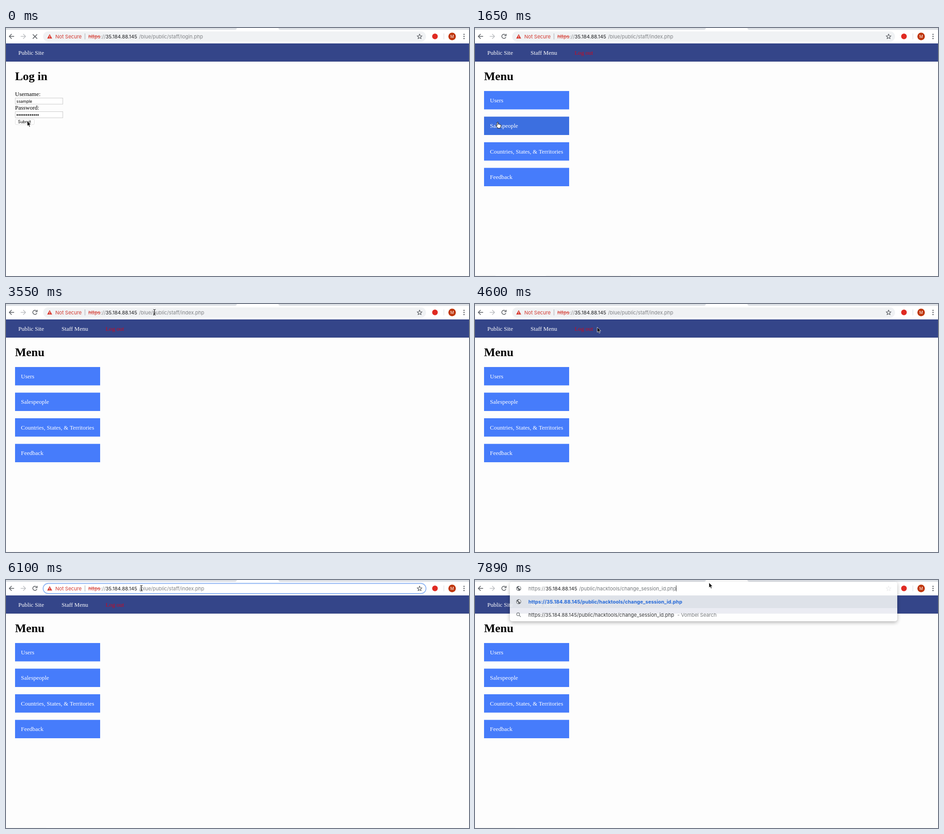
Write an HTML page that moves like this. It is 1023 by 547 pixels and loops after 8 s.

```html
<!DOCTYPE html>
<html lang="en">
<head>
<meta charset="utf-8">
<title>Staff log in</title>
<style>
html, body { margin: 0; width: 100%; height: 100%; overflow: hidden; background: #fdfdfd; }
svg { display: block; width: 100vw; height: 100vh; }
text { white-space: pre; }
.ui { font: 11px Inter, "Liberation Sans", sans-serif; }
.form { font: 8.8px Inter, "Liberation Sans", sans-serif; }
.page { font: 13px "Liberation Serif", "Times New Roman", serif; }
.title { font: bold 26px "Liberation Serif", "Times New Roman", serif; }
.line { fill: none; stroke-width: 1.5; }
.popup { filter: drop-shadow(0 3px 4px rgba(0, 0, 0, .32)); }
</style>
</head>
<body>
<svg viewBox="0 0 1023 547" preserveAspectRatio="none">
  <defs>
    <filter id="soft" x="-10%" y="-200%" width="120%" height="500%"><feGaussianBlur stdDeviation="1.2"/></filter>
    <g id="globe">
      <circle r="5.3" fill="#5b5f64"/>
      <path d="M-4.2-1.2L-.8 1.8V4.3C-3 4-4.6 1.8-4.2-1.2ZM.6-4.2C.6-2.6-.6-2.6-1.4-2V-.6H1.6V1.2H2.6L3.4 2.4C4.6.6 4.6-2.6 1.8-3.9Z" fill="#fff"/>
    </g>
  </defs>

  <rect width="1023" height="547" fill="#fdfdfd"/>

  <!-- browser bar -->
  <rect width="1023" height="34" fill="#fff"/>
  <path d="M0 0H510Q510 4 505 4H0ZM602 0H1023V4H607Q602 4 602 0Z" fill="#dee1e6"/>
  <g class="line" stroke="#55595e">
    <path d="M18 18.5H7.5M12.5 13.3L7.3 18.5L12.5 23.7"/>
    <path d="M32.5 18.5H43M38 13.3L43.2 18.5L38 23.7" stroke="#bcbec1"/>
    <path id="stop" d="M59.2 14L68.8 23.6M68.8 14L59.2 23.6"/>
    <path id="reload" d="M68.3 20A4.7 4.7 0 1 1 67.4 15.2M68.8 13V16.9H64.9"/>
  </g>
  <rect id="pill" x="82" y="7.5" width="846" height="22.5" rx="11.25"/>
  <g id="address">
    <path d="M96.5 13.5L102 23.3H91Z" fill="#d93a30"/>
    <path d="M96.5 16.8V19.8M96.5 20.8V22" stroke="#fff" stroke-width="1.1"/>
    <path d="M174.5 12V25" stroke="#a9abae"/>
    <rect id="selection" x="297.5" y="11" height="15" fill="#b4d6fc"/>
    <g class="ui">
      <text x="109" y="22.6" fill="#d3382f">Not Secure</text>
      <text x="182" y="22.6" fill="#d3382f">https</text>
      <text x="209" y="22.6" fill="#808387">://</text>
      <text x="220" y="22.6" fill="#202124">35.184.88.145</text>
      <text x="294" y="22.6" fill="#808387">/</text>
      <text id="path" x="298" y="22.6"></text>
    </g>
    <path d="M182 19H209" stroke="#d3382f"/>
  </g>
  <path id="star" class="line" stroke="#55595e" stroke-linejoin="round" style="stroke-width:1.2"/>
  <circle cx="947.8" cy="18.5" r="6.2" fill="#e02a22"/>
  <path d="M967.5 12V25" stroke="#d8dade"/>
  <circle cx="985.7" cy="18.6" r="8.3" fill="#bf360c"/>
  <text class="form" x="985.7" y="21.8" fill="#fff" text-anchor="middle">M</text>
  <g fill="#55595e"><circle cx="1012" cy="14" r="1.3"/><circle cx="1012" cy="18.6" r="1.3"/><circle cx="1012" cy="23.2" r="1.3"/></g>

  <!-- page -->
  <rect y="34" width="1023" height="40" fill="#344589"/>
  <path d="M0 73.7H1023" stroke="#2b3a78" stroke-width=".7"/>
  <text class="page" x="27.3" y="59.3" fill="#fff">Public Site</text>

  <g id="login">
    <text class="title" x="20" y="115">Log in</text>
    <text class="page" x="20" y="150.3">Username:</text>
    <text class="page" x="20" y="180.3">Password:</text>
    <g fill="#fff" stroke="#c9c9c9">
      <rect x="20.5" y="154.5" width="105" height="13.5"/>
      <rect x="20.5" y="184.5" width="105" height="13.5"/>
      <rect x="20.5" y="201" width="42" height="12" rx="2.5" stroke="#dedede"/>
    </g>
    <g class="form">
      <text x="23" y="164.6">ssample</text>
      <text x="26.5" y="210">Submit</text>
    </g>
    <g id="dots"></g>
  </g>

  <g id="menu">
    <text class="page" x="122.8" y="59.3" fill="#fff">Staff Menu</text>
    <text class="page" x="220" y="59.3" fill="#cb0a20">Log out</text>
    <text class="title" x="20" y="115">Menu</text>
  </g>

  <g id="status" filter="url(#soft)" fill="#000"></g>

  <!-- suggestions -->
  <g id="suggest">
    <g class="popup" opacity=".9">
      <rect x="77" y="4" width="856" height="87" rx="5" fill="#fff"/>
      <rect x="77" y="34" width="856" height="28" fill="#f1f3f4"/>
    </g>
    <use href="#globe" x="96.5" y="18.5"/>
    <use href="#globe" x="96.5" y="47.7"/>
    <path class="line" d="M97.9 78.2L101 81.4M98.5 75.6A3.2 3.2 0 1 1 92.1 75.6A3.2 3.2 0 1 1 98.5 75.6" stroke="#6a6e73" style="stroke-width:1.2"/>
    <g class="ui">
      <text x="118" y="22.6" fill="#74787c">https://</text>
      <text x="156" y="22.6" fill="#202124">35.184.88.145</text>
      <text x="230" y="22.6" fill="#74787c">/public/hacktools/change_session_id.php</text>
      <text x="118" y="51.8" fill="#2468d8" font-weight="700">https://35.184.88.145/public/hacktools/change_session_id.php</text>
      <text x="118" y="80.8" fill="#303236">https://35.184.88.145/public/hacktools/change_session_id.php</text>
      <text x="447" y="80.8" fill="#74787c">- Vombel Search</text>
    </g>
    <path d="M444.5 12V25" stroke="#333"/>
  </g>

  <!-- pointers -->
  <g id="pointer" stroke-linejoin="round">
    <path id="arrow" d="M0 0V11.3L2.6 9L4.4 13.2L6.3 12.4L4.5 8.3H8Z" fill="#000" stroke="#fff" stroke-width=".8"/>
    <path id="hand" d="M-2 1Q-2-.5-.8-.5T.5 1V4.4Q1.8 3.4 2.6 4.6Q4 3.9 4.6 5.2Q6.6 4.8 6.6 6.8Q6.6 9.5 5.2 11.3V13H-1.2V11.6Q-3.4 9-4.8 6.9Q-4.6 5.4-3.2 6L-2 7.2Z" fill="#fff" stroke="#000" stroke-width="1"/>
    <path id="beam" d="M-2.8-6Q0-6 0-4.5Q0-6 2.8-6M0-4.5V4.8M-2.8 6.2Q0 6.2 0 4.8Q0 6.2 2.8 6.2M-1.5 2.5H1.5" fill="none" stroke="#111" stroke-width="1.1"/>
  </g>
</svg>

<script>
const LOOP = 8000;
const $ = id => document.getElementById(id);
const show = (id, on) => { $(id).style.display = on ? "" : "none"; };

function add(parent, tag, attrs, text = "") {
  const el = document.createElementNS("http://www.w3.org/2000/svg", tag);
  for (const key in attrs) el.setAttribute(key, attrs[key]);
  el.textContent = text;
  parent.append(el);
  return el;
}

const buttons = ["Users", "Salespeople", "Countries, States, & Territories", "Feedback"].map((label, i) => {
  const y = 139 + i * 56.5;
  const box = add($("menu"), "rect", { x: 20, y, width: 188, height: 40.5, fill: "#467cfb" });
  add($("menu"), "text", { class: "page", x: 33, y: y + 24.6, fill: "#fff" }, label);
  return box;
});

for (let i = 0; i < 12; i++) add($("dots"), "circle", { cx: 24.9 + i * 4.17, cy: 191.7, r: 1.55 });

$("star").setAttribute("d", "M" + Array.from({ length: 10 }, (_, i) => {
  const r = i % 2 ? 2.5 : 5.7, a = i * Math.PI / 5;
  return `${913.8 + r * Math.sin(a)} ${19 - r * Math.cos(a)}`;
}).join("L") + "Z");

const statusLeft = add($("status"), "rect", { x: -5, y: 546, height: 6 });
const statusRight = add($("status"), "rect", { y: 546, height: 6 });

const pointerTrack = [
  [0, "arrow", 47, 205],
  [1500, "hand", 49, 206], [1650, "hand", 51, 208], [1830, "hand", 58, 212],
  [2130, "hand", 130, 226], [2280, "hand", 178, 231], [2430, "arrow", 226, 214],
  [2600, "arrow", 262, 160], [2770, "arrow", 288, 95], [2940, "arrow", 301, 45],
  [3260, "beam", 322, 22], [3400, "beam", 327, 19], [3550, "beam", 328, 18],
  [3790, "arrow", 305, 80], [4030, "arrow", 271, 166],
  [4360, "arrow", 263, 110], [4600, "arrow", 270, 51],
  [4900, "arrow", 274, 44], [5050, "arrow", 281, 36], [5200, "beam", 288, 28],
  [5350, "beam", 293, 23], [5500, "beam", 296, 20], [5650, "beam", 298, 19], [5800, "beam", 299, 18],
  [6100, "beam", 299, 18], [6250, "beam", 345, 17], [6400, "beam", 410, 16],
  [6550, "beam", 470, 14], [6690, "beam", 508, 13], [6840, "arrow", 517, 5.7]
];
const selectionTrack = [[0, 0], [6250, 47], [6400, 112], [6550, 140.5]];

// time, left edge end, left opacity, right edge start, right opacity
const statusTrack = [
  [0, 0, 0, 0, 0],
  [450, 140, .13, 135, .07],
  [1650, 45, .05, 157, .05],
  [2600, 90, .025, 0, 0]
];

const at = (track, t) => track.findLast(step => step[0] <= t).slice(1);

function draw(t) {
  const loggedIn = t >= 750, focused = t >= 6100, typed = t >= 7890;

  show("login", !loggedIn);
  show("menu", loggedIn);
  show("stop", t < 900);
  show("reload", t >= 900);
  show("address", !typed);
  show("suggest", typed);

  const [selected] = at(selectionTrack, t);
  $("selection").setAttribute("width", selected);
  $("path").textContent = `blue/public/staff/${loggedIn ? "index" : "login"}.php`;
  $("path").setAttribute("fill", selected ? "#303236" : "#808387");
  $("pill").setAttribute("fill", focused ? "#fff" : "#f0f2f4");
  $("pill").setAttribute("stroke", focused && !typed ? "#8db4f3" : "none");
  $("pill").setAttribute("stroke-width", 1.8);

  buttons[1].setAttribute("fill", t >= 1500 && t < 2430 ? "#3c6fe0" : "#467cfb");

  const [leftEnd, leftAlpha, rightStart, rightAlpha] = at(statusTrack, t);
  statusLeft.setAttribute("width", leftEnd + 5);
  statusLeft.setAttribute("opacity", leftAlpha);
  statusRight.setAttribute("x", rightStart);
  statusRight.setAttribute("width", 344 - rightStart);
  statusRight.setAttribute("opacity", rightAlpha);

  const [shape, x, y] = at(pointerTrack, t);
  for (const id of ["arrow", "hand", "beam"]) show(id, id === shape);
  $("pointer").setAttribute("transform", `translate(${x} ${y})`);
}

function tick() {
  draw(performance.now() % LOOP);
  requestAnimationFrame(tick);
}
tick();
</script>
</body>
</html>
```
